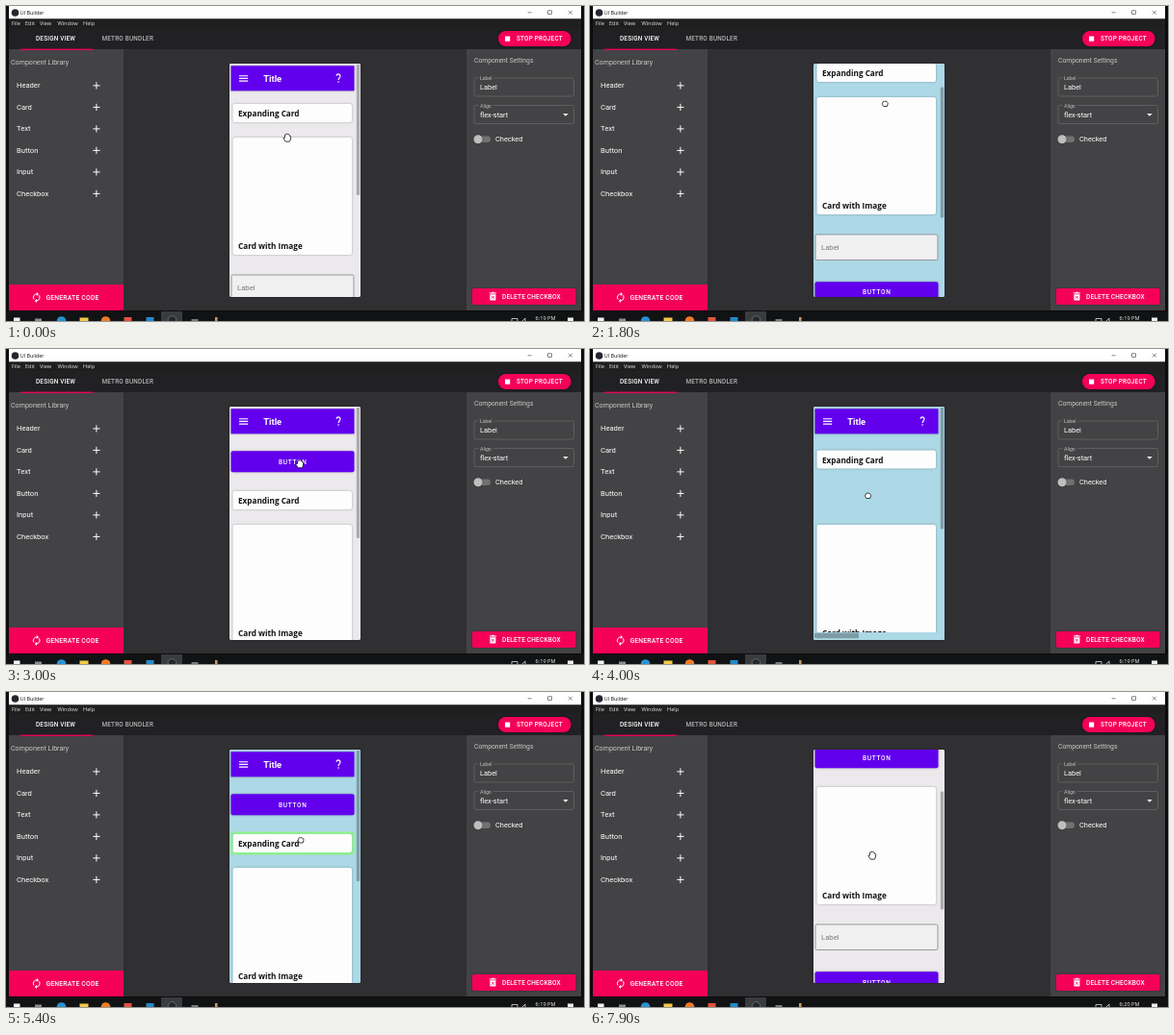
Recreate the animation shown at these times as an HTML page. Size 600x328 px, loop 8 s.

```html
<!DOCTYPE html>
<html lang="en">
<head>
<meta charset="utf-8">
<title>UI Builder</title>
<style>
  html, body { margin: 0; width: 100%; height: 100%; overflow: hidden; background: #0c0c0c; }
  svg { display: block; width: 600px; height: 328px; }
  text { font-family: Roboto, sans-serif; white-space: pre; }
  .seg { font-family: "Open Sans", sans-serif; }
  .caps { font-weight: 500; letter-spacing: .2px; }
  .raised { filter: drop-shadow(0 .8px .9px rgba(0, 0, 0, .3)); }
</style>
</head>
<body>
<svg id="stage" viewBox="0 0 600 328">
  <defs><clipPath id="screen"><rect x="232" y="60" width="136" height="243" rx="2"/></clipPath></defs>
</svg>
<script>
const LOOP = 8000;
const PINK = '#f50057', PURPLE = '#6200ee', GREY = '#ebe9eb', BLUE = '#add8e6', GREEN = '#90ee90';
const PANEL = '#434244';
const stage = document.getElementById('stage');

function add(parent, tag, attrs) {
  const el = document.createElementNS('http://www.w3.org/2000/svg', tag);
  for (const key in attrs) el.setAttribute(key, attrs[key]);
  return parent.appendChild(el);
}
const group = (parent, attrs = {}) => add(parent, 'g', attrs);
const rect = (parent, x, y, width, height, fill, more = {}) =>
  add(parent, 'rect', { x, y, width, height, fill, ...more });
const dot = (parent, cx, cy, r, fill, more = {}) => add(parent, 'circle', { cx, cy, r, fill, ...more });
const line = (parent, d, stroke, width = 1, more = {}) =>
  add(parent, 'path', { d, stroke, 'stroke-width': width, fill: 'none', ...more });
function label(parent, x, y, size, fill, string, more = {}) {
  const el = add(parent, 'text', { x, y, 'font-size': size, fill, ...more });
  el.textContent = string;
  return el;
}
const place = (el, x, y) => el.setAttribute('transform', `translate(${x} ${y})`);
const show = (el, on) => el.setAttribute('visibility', on ? 'visible' : 'hidden');

// Window frame, title bar and menu
rect(stage, 0, 0, 600, 328, '#0c0c0c');
rect(stage, 3, 0, 594, 13.5, '#fff');
dot(stage, 9.5, 7, 3.8, '#25262e');
label(stage, 14.7, 9, 5.4, '#111', 'UI Builder', { class: 'seg' });
line(stage, 'M541.6 6.8h4', '#333', .6);
rect(stage, 562.7, 4.8, 3.6, 3.6, 'none', { stroke: '#333', 'stroke-width': .6 });
line(stage, 'M584 4.8l3.7 3.7m0-3.7l-3.7 3.7', '#333', .6);
rect(stage, 3, 13.5, 594, 9.5, '#1f1f20');
[[6, 'File'], [20, 'Edit'], [35, 'View'], [53.5, 'Window'], [80, 'Help']]
  .forEach(([x, s]) => label(stage, x, 20, 5.6, '#e4e4e4', s, { class: 'seg' }));

// App bar
rect(stage, 3, 45, 594, 272, '#302f32');
rect(stage, 3, 23, 594, 22, '#212023');
label(stage, 31, 36.2, 6.35, '#fff', 'DESIGN VIEW', { class: 'caps' });
label(stage, 99.4, 36.2, 6.4, '#b5b5b5', 'METRO BUNDLER', { class: 'caps' });
rect(stage, 511, 26, 75.5, 16, PINK, { rx: 8, class: 'raised' });
rect(stage, 518, 31.5, 5.2, 5.2, '#fff');
label(stage, 530, 36.3, 6.4, '#fff', 'STOP PROJECT', { class: 'caps' });

// Component library
const ROW = 22.5;
rect(stage, 3, 45, 119, 245, PANEL);
rect(stage, 15, 44.6, 75, 1.3, PINK);
const hover = rect(stage, 3, 0, 119, ROW, '#505051');
label(stage, 5, 60.6, 7.1, '#c9c9c9', 'Component Library');
['Header', 'Card', 'Text', 'Button', 'Input', 'Checkbox'].forEach((name, i) => {
  const y = 82.9 + i * ROW;
  label(stage, 11, y + 2.5, 7.6, '#fff', name);
  line(stage, `M90.3 ${y}h7.2m-3.6-3.6v7.2`, '#fff', 1);
});
rect(stage, 3, 290, 119, 27, PINK);
line(stage, 'M29 305.5a3.5 3.5 0 0 1 3.3-5.5m2 1.3a3.5 3.5 0 0 1-2.5 5.6', '#fff', 1);
add(stage, 'path', { d: 'M31.8 298l2.2 2-2.2 2zM32 305l-2.2 2 2.2 2z', fill: '#fff' });
label(stage, 41.4, 305.6, 6.8, '#fff', 'GENERATE CODE', { class: 'caps' });

// Component settings
rect(stage, 478, 45, 119, 272, PANEL);
label(stage, 486, 58.6, 6.75, '#c9c9c9', 'Component Settings');
function field(y, name, value, gap) {
  rect(stage, 486, y, 103.5, 19, 'none', { rx: 1.8, stroke: '#6c6c6c', 'stroke-width': .7 });
  rect(stage, 490.5, y - 1, gap, 2, PANEL);
  label(stage, 492, y + 2, 5.2, '#c2c2c2', name);
  label(stage, 492, y + 12.3, 7.4, '#fff', value);
}
field(75, 'Label', 'Label', 15.5);
field(103.5, 'Align', 'flex-start', 15);
add(stage, 'path', { d: 'M578.2 112h5.4l-2.7 2.8z', fill: '#fff' });
rect(stage, 486.5, 135.5, 16.5, 6.5, '#717171', { rx: 3.25 });
dot(stage, 490, 138.7, 4.5, '#bdbdbd', { class: 'raised' });
label(stage, 508, 141.4, 7.4, '#fff', 'Checked');
rect(stage, 484, 294, 107.5, 17, PINK, { rx: 2, class: 'raised' });
add(stage, 'path', { d: 'M501.8 298.6h2l.6-.8h2l.6.8h2v1h-7.2zM502.4 300.2h6v6.4h-6z', fill: '#fff' });
line(stage, 'M504 302l2.8 2.8m0-2.8l-2.8 2.8', PINK, .8);
label(stage, 515, 304.8, 6.5, '#fff', 'DELETE CHECKBOX', { class: 'caps' });

// Taskbar
rect(stage, 0, 318, 600, 10, '#111213');
rect(stage, 161, 318, 22, 10, '#3a3b3d');
rect(stage, 8, 324.5, 6.5, 5, '#f2f2f2');
rect(stage, 30, 325.5, 7, 4, '#8d8d8d');
dot(stage, 57.5, 328, 4.8, '#2791d2');
rect(stage, 76.5, 324.5, 9, 5, '#f3c84b');
dot(stage, 103.5, 328, 4.8, '#f07b26');
rect(stage, 122.5, 324, 8, 6, '#e2533d');
rect(stage, 145.5, 324, 8, 6, '#2489ca');
dot(stage, 172.5, 327, 4.3, '#25262e', { stroke: '#8a8c96', 'stroke-width': .6 });
rect(stage, 192.5, 326, 7, 4, '#77797b');
rect(stage, 217, 324, 2.5, 5, '#c99b62');
line(stage, 'M525 328v-2.5h6v2.5M536 328l3-3v3', '#ddd', .8);
const clock = label(stage, 549.5, 327.2, 5.6, '#f2f2f2', '', { class: 'seg' });
rect(stage, 583, 324.5, 6, 4, '#eee');

// Phone preview; every part is drawn with its top at zero
rect(stage, 232, 60, 136, 243, GREY, { rx: 2, class: 'raised' });
const phone = group(stage, { 'clip-path': 'url(#screen)' });
const backdrop = rect(phone, 232, 60, 136, 243, GREY);
const list = group(phone);
const band = rect(list, 232, 108, 131, 34, GREEN);
const part = () => group(list);

function button() {
  const g = part();
  rect(g, 233.5, .3, 128, 22, PURPLE, { rx: 2, class: 'raised' });
  label(g, 283, 13.5, 6.5, '#fff', 'BUTTON', { 'font-weight': 500, 'letter-spacing': .7 });
  return g;
}
function card(height, title) {
  const g = part();
  rect(g, 235.5, 0, 123.5, height, '#fdfdfe', { rx: 2, class: 'raised' });
  label(g, 241, height - 6, 8.2, '#111', title, { class: 'seg', 'font-weight': 700 });
  return g;
}
function header() {
  const g = part();
  rect(g, 233.5, .3, 128, 26, PURPLE, { class: 'raised' });
  line(g, 'M242 10.7h9.2m-9.2 2.7h9.2m-9.2 2.7h9.2', '#fff', 1.1);
  label(g, 267.3, 16.6, 9.3, '#fff', 'Title', { 'font-weight': 600 });
  line(g, 'M343 10.8q.2-1.9 2.1-1.9 1.9.1 1.9 2c0 1.8-1.9 2-1.9 4', '#fff', 1.2);
  dot(g, 345.1, 17, .8, '#fff');
  return g;
}
function input() {
  const g = part();
  rect(g, 234, 0, 127, 26.5, '#f0f0f1', { rx: 1.5, stroke: '#85858a', 'stroke-width': .8 });
  label(g, 240, 16.2, 7.7, '#7a7a7c', 'Label');
  return g;
}
function caption() {
  const g = part();
  label(g, 297.5, 1.3, 3.7, '#222', 'wow such text', { class: 'seg', 'font-weight': 700, 'text-anchor': 'middle' });
  return g;
}
const parts = [header(), card(19, 'Expanding Card'), button(), card(122, 'Card with Image'), input(), button(), caption()];
const outline = rect(list, 234.3, 146.8, 126, 21.4, 'none', { rx: 2, stroke: GREEN, 'stroke-width': 2.4 });
const bottomBar = group(phone);
rect(bottomBar, 232, 295, 136, 8, BLUE);
rect(bottomBar, 233, 295.8, 46, 5.4, '#000', { rx: 1, opacity: .28 });
const thumb = rect(phone, 363.8, 61, 3.4, 136, '#000', { rx: 1, opacity: .27 });

// Cursors, centred on zero
const ink = { fill: '#fff', stroke: '#111', 'stroke-width': .8, 'stroke-linejoin': 'round' };
const cursors = {
  open: 'M-1.8 4.2L-4 .9Q-4.2-.6-2.6 .2L-2.4-2.9Q-1.6-3.8-1.1-2.8L-.8-3.7Q0-4.6.6-3.6L.9-3.2Q1.9-3.8 2.2-2.5L2.4-1.6Q3.6-2 3.7-.8L3.4 2 2.4 4.2Z',
  fist: 'M-1.5 3L-2.9 .8Q-3.1-.5-2.2-.7L-2-1.9Q-1.2-2.7-.6-2.1 .3-2.9 .9-2.1 2-2.4 2.3-1.4 3.2-1.2 3 .2L2.2 3Z',
  point: 'M-1.5 5.6L-4.2 1.4Q-4.2 0-2.7 .8L-2 1.6V-4.8Q-.9-6 0-4.8V-1Q1-1.6 1.5-.6 2.5-1 2.9 0 4-.1 4 1.2L3.4 5.6Z'
};
for (const kind in cursors) cursors[kind] = add(stage, 'path', { d: cursors[kind], ...ink });

// Tops of: header, small card, moved button, image card, input, last button, caption
const START = [62, 102, 329, 137, 280, 375, 422];
const UNDER = [326, 375, 422];
const FIRST = [62, 148, 106, 183, ...UNDER];
const SECOND = [62, 102, 141, 183, ...UNDER];
const layouts = [
  { t: 0, bg: GREY, tops: START },
  { t: 1400, bg: BLUE, tops: START },
  { t: 2000, bg: BLUE, tops: [70, 148, 114, 183, ...UNDER], band: true },
  { t: 2600, bg: GREY, tops: FIRST },
  { t: 3400, bg: BLUE, tops: FIRST },
  { t: 3700, bg: BLUE, tops: [62, 105.5, null, 183, ...UNDER], wide: true },
  { t: 4700, bg: BLUE, tops: FIRST },
  { t: 5100, bg: BLUE, tops: FIRST, outline: true },
  { t: 5700, bg: BLUE, tops: SECOND },
  { t: 6000, bg: GREY, tops: SECOND },
  { t: 7000, bg: GREY, tops: SECOND, total: 480 }
];
const scrolls = [[0, 0], [300, 0], [900, 141], [1450, 141], [1950, 0], [7400, 0], [7850, 84], [8000, 84]];
const moves = [
  [0, 292, 137, 'open'], [850, 292, 138, 'open'], [1100, 307, 197, 'point'], [1400, 307, 197, 'fist'],
  [1900, 306, 78, 'fist'], [2200, 306, 121, 'fist'], [2600, 306, 121, 'open'], [3400, 304, 118, 'fist'],
  [3800, 288.5, 152.5, 'fist'], [4500, 288.5, 152.5, 'fist'], [4700, 300, 118, 'open'],
  [5000, 306, 154, 'fist'], [5500, 306, 154, 'fist'], [5750, 306, 112, 'fist'], [6000, 290, 120, 'open'],
  [6250, 150, 165, 'point'], [6450, 82, 176, 'point'], [6680, 82, 152, 'point'], [6750, 82, 152, 'point'],
  [6900, 94, 152, 'point'], [7050, 94, 152, 'point'], [7350, 293, 170, 'open'], [8000, 293, 170, 'open']
];
const hovers = [[0, -1], [6380, 4], [6740, 3], [7100, -1]];

const last = (rows, t) => rows.filter(row => (row.t ?? row[0]) <= t).pop();
function tween(rows, t, col) {
  const i = Math.max(1, rows.findIndex(row => row[0] > t));
  const a = rows[i - 1], b = rows[i];
  return a[col] + (b[col] - a[col]) * (t - a[0]) / (b[0] - a[0]);
}

function draw(t) {
  const now = last(layouts, t);
  const scroll = tween(scrolls, t, 1);
  backdrop.setAttribute('fill', now.bg);
  place(list, 0, -scroll);
  parts.forEach((el, i) => {
    const top = now.tops[i];
    show(el, top !== null);
    place(el, now.band && i === 2 ? 1 : 0, top ?? 0);
  });
  show(band, now.band);
  show(outline, now.outline);
  show(bottomBar, now.wide);

  const scale = (now.wide ? 226 : 243) / (now.total || 434);
  thumb.setAttribute('y', 61 + scroll * scale);
  thumb.setAttribute('height', 243 * scale);

  const row = last(hovers, t)[1];
  show(hover, row >= 0);
  hover.setAttribute('y', 83 + (row - .5) * ROW);
  clock.textContent = t < 7300 ? '6:19 PM' : '6:20 PM';

  const kind = last(moves, t)[3];
  for (const name in cursors) show(cursors[name], name === kind);
  place(cursors[kind], tween(moves, t, 1), tween(moves, t, 2));
}

const begin = performance.now();
function tick() {
  draw((performance.now() - begin) % LOOP);
  requestAnimationFrame(tick);
}
tick();
</script>
</body>
</html>
```
